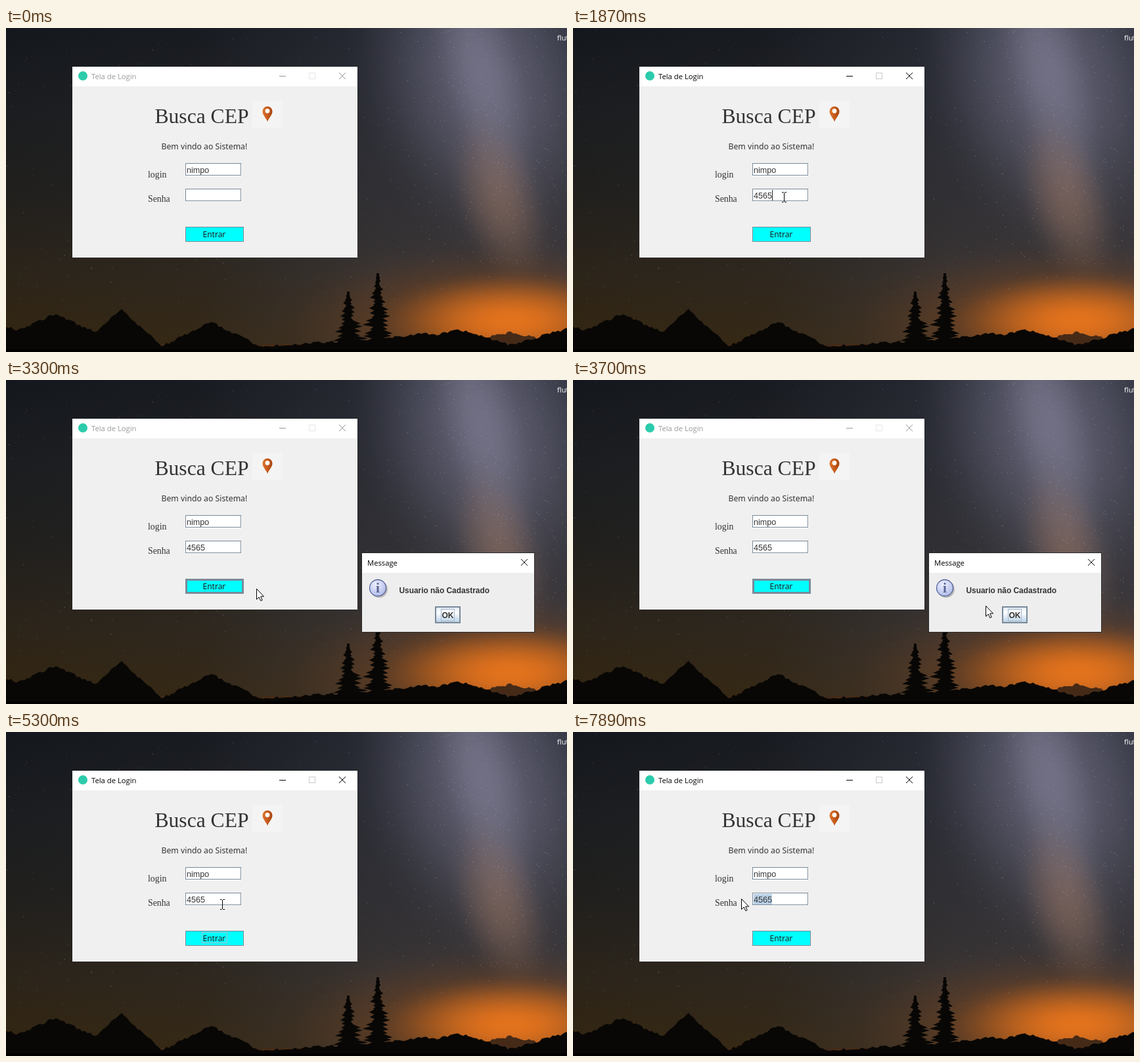
Animation of 854x494 px, one loop 8 s. Source, as an HTML page with a canvas:

```html
<!DOCTYPE html>
<html lang="pt">
<head>
<meta charset="utf-8">
<title>Tela de Login</title>
<style>
  html, body { margin: 0; width: 100%; height: 100%; overflow: hidden; background: #000; }
  canvas, svg { position: absolute; left: 0; top: 0; width: 854px; height: 494px; display: block; }
  text { white-space: pre; fill: #333; }
  .ui { font: 11.25px "Open Sans", sans-serif; }
  .label { font: 12.25px "Noto Sans", sans-serif; }
  .serif { font: 13.8px "Liberation Serif", serif; }
  .field { font: 12.6px "Liberation Sans", sans-serif; }
  .bold { font: bold 11.9px "Liberation Sans", sans-serif; }
  .box { fill: #fff; stroke: #7a8a99; }
  .line { fill: none; stroke: currentColor; }
  .sel { fill: #b8cfe5; }
</style>
</head>
<body>
<canvas id="sky" width="854" height="494"></canvas>
<svg viewBox="0 0 854 494">
  <defs>
    <linearGradient id="metal" x2="0" y2="1">
      <stop stop-color="#dde8f3"/><stop offset=".35" stop-color="#fff"/><stop offset="1" stop-color="#b8cfe5"/>
    </linearGradient>
    <radialGradient id="info" cx=".4" cy=".3" r=".8">
      <stop stop-color="#eef0ff"/><stop offset="1" stop-color="#aab5e6"/>
    </radialGradient>
    <linearGradient id="pin">
      <stop stop-color="#e0752c"/><stop offset="1" stop-color="#a9440d"/>
    </linearGradient>
  </defs>
  <text class="ui" x="839" y="19" style="fill:#fff">flut</text>

  <rect x="100" y="58" width="436" height="293" fill="#222" opacity=".5"/>
  <rect x="101" y="59" width="434" height="291" fill="#f0f0f0"/>
  <rect x="101" y="59" width="434" height="30" fill="#fff"/>
  <circle cx="117" cy="73" r="7" fill="#2bcbab"/>
  <g id="title">
    <text class="ui" x="130" y="78" style="fill:currentColor">Tela de Login</text>
    <path class="line" d="M416 73.5H426M507 68L517 78M517 68L507 78"/>
  </g>
  <rect id="max" x="461.5" y="68.5" width="9" height="9" fill="none"/>

  <text class="serif" x="226.5" y="145" style="font-size:31.6px">Busca CEP</text>
  <rect x="375" y="111" width="46" height="41" fill="#f4f4f4"/>
  <path d="M398 143C396 137 390.5 133 390.5 127A7.5 7.5 0 0 1 405.5 127C405.5 133 400 137 398 143Z" fill="url(#pin)"/>
  <circle cx="398" cy="126.5" r="3.4" fill="#fff"/>
  <text class="label" x="236.5" y="185">Bem vindo ao Sistema!</text>
  <text class="serif" x="216" y="228">login</text>
  <text class="serif" x="216" y="265">Senha</text>

  <rect x="274" y="207" width="85" height="19" fill="#fff"/>
  <rect class="box" x="273.5" y="206.5" width="84" height="18"/>
  <rect id="loginSel" class="sel" y="208" height="16"/>
  <text class="field" x="275" y="221">nimpo</text>
  <rect x="274" y="246" width="85" height="19" fill="#fff"/>
  <rect class="box" x="273.5" y="245.5" width="84" height="18"/>
  <rect id="passSel" class="sel" y="247" height="16"/>
  <text id="pass" class="field" x="275" y="260"></text>
  <rect id="caret" width="1" height="16" fill="#222"/>

  <rect id="enter" x="273.5" y="303.5" width="88" height="22" stroke="#7a8a99"/>
  <rect id="ring" x="275" y="305" width="85" height="19" fill="none" stroke="#7a8a99" stroke-width="2"/>
  <rect id="enterFocus" x="298.5" y="305.5" width="38" height="16" fill="none" stroke="#a3b8cc"/>
  <text class="label" x="299.5" y="319" style="font-size:12px;font-weight:500;fill:#222">Entrar</text>

  <g id="dialog">
    <rect x="541.5" y="263.5" width="263" height="121" fill="#eee" stroke="#2b2b2b"/>
    <rect x="542" y="264" width="262" height="30" fill="#fff"/>
    <text class="ui" x="550" y="283" style="fill:#000">Message</text>
    <path class="line" color="#111" d="M784 273L794 283M794 273L784 283"/>
    <circle cx="568" cy="319" r="13" fill="#000" opacity=".22"/>
    <circle cx="566" cy="317" r="12.5" fill="url(#info)" stroke="#56659a" stroke-width="1.3"/>
    <text x="566" y="324" text-anchor="middle" style="font:bold 21px 'Liberation Serif',serif;fill:#5a6494">i</text>
    <text class="bold" x="598.5" y="325">Usuario não Cadastrado</text>
    <rect id="ok" x="654" y="346" width="37" height="24" stroke="#7a8a99" stroke-width="2"/>
    <rect id="okFocus" x="662.5" y="349.5" width="20" height="18" fill="none" stroke="#a3b8cc"/>
    <text class="bold" x="663.5" y="363" style="font-size:12px">OK</text>
  </g>

  <circle id="press" r="12" fill="#e6e61e"/>
  <g id="cursor">
    <path id="arrow" d="M.5.5V16.5L4.2 13L6.8 18.7L9.2 17.6L6.7 12H11.6Z" fill="#fff" stroke="#000"/>
    <path id="beam" class="line" color="#000" d="M-3 -7.5H-.5M1.5 -7.5H4M.5 -7V7M-3 7.5H-.5M1.5 7.5H4"/>
  </g>
</svg>
<script>
const $ = id => document.getElementById(id);

function drawSky() {
  const c = $('sky').getContext('2d');
  let seed = 7;
  const rnd = () => (seed = seed * 16807 % 2147483647) / 2147483647;

  function wash(x1, y1, ...colors) {
    const g = c.createLinearGradient(0, 0, x1, y1);
    colors.forEach((col, i) => g.addColorStop(i / (colors.length - 1), col));
    c.fillStyle = g;
    c.fillRect(0, 0, 854, 494);
  }
  function glow(x, y, rx, ry, turn, rgb, alpha) {
    const g = c.createRadialGradient(0, 0, 0, 0, 0, 1);
    for (let r = 0; r <= 1; r += .125)
      g.addColorStop(r, `rgba(${rgb},${alpha * (1 - r * r) ** 2})`);
    c.save();
    c.translate(x, y);
    c.rotate(turn);
    c.scale(rx, ry);
    c.fillStyle = g;
    c.fillRect(-1, -1, 2, 2);
    c.restore();
  }
  // each peak is x, y and slope; the highest one shows
  function ridge(color, floor, peaks) {
    c.fillStyle = color;
    c.beginPath();
    c.moveTo(0, 494);
    for (let x = 0; x <= 856; x += 4)
      c.lineTo(x, Math.min(floor, ...peaks.map(([px, py, k]) => py + Math.abs(x - px) * k)) + rnd() * 4);
    c.lineTo(856, 494);
    c.fill();
  }
  function tree(x, top, width) {
    const reach = y => 2 + width * Math.min(1, (y - top) / 80) * (.35 + rnd() * .65);
    c.fillRect(x - 2, top, 4, 494 - top);
    for (let y = top + 5; y < 492; y += 6) {
      c.beginPath();
      c.moveTo(x, y - 6);
      c.lineTo(x - reach(y), y + rnd() * 4);
      c.lineTo(x, y + 6);
      c.lineTo(x + reach(y), y + rnd() * 4);
      c.fill();
    }
  }

  wash(0, 494, '#14171c', '#1b1d20', '#201f1d', '#2b241a', '#35260f');
  wash(854, 0, 'rgba(85,85,105,0)', 'rgba(85,85,105,.06)', 'rgba(85,85,105,.3)', 'rgba(85,85,105,.4)');
  glow(725, 70, 200, 300, -.25, '140,138,165', .5);
  glow(725, 70, 70, 230, -.25, '165,160,185', .28);
  glow(752, 262, 75, 150, -.3, '175,130,105', .42);
  glow(750, 450, 360, 130, 0, '150,75,20', .55);
  glow(768, 446, 210, 78, 0, '240,120,28', .9);

  for (let i = 0; i < 1800; i++) {
    const band = i > 600, y = rnd() * (band ? 360 : 430);
    const x = band ? 705 + y * .2 + (rnd() + rnd() - 1) * 170 : rnd() * 854;
    c.fillStyle = `rgba(205,195,200,${.08 + .4 * rnd() ** 3})`;
    c.fillRect(x | 0, y | 0, 1, 1);
  }

  ridge('#452a17', 480, [[768, 462, .2]]);
  ridge('#080705', 485, [[0, 453, .3], [74, 434, .45], [175, 427, .9], [312, 446, .5],
    [540, 474, .06], [636, 463, .15], [687, 457, .3], [854, 456, .3]]);
  tree(566, 374, 24);
  tree(521, 402, 32);
  c.fillStyle = '#000';
  c.fillRect(0, 490, 854, 4);
}

// pointer moves: start, end, x, y
const moves = [[70, 650, 321, 258], [2400, 2900, 328, 312], [3230, 3690, 633, 345], [4050, 4300, 726, 322],
  [4300, 4600, 670, 354], [4820, 5100, 329, 304], [5300, 5300, 329, 263], [5380, 5750, 303, 218],
  [5750, 6060, 330, 216], [6140, 6480, 246, 216], [6740, 7110, 308, 254], [7190, 7410, 256, 254]];
const STEP = 70;

function pointer(t) {
  let x = 676, y = 470;
  for (const [start, end, toX, toY] of moves) {
    if (t < start) break;
    const done = (Math.floor((t - start) / STEP) + 1) * STEP;
    const k = Math.min(1, done / (end - start + STEP));
    const ease = k * k * (3 - 2 * k);
    x += (toX - x) * ease;
    y += (toY - y) * ease;
  }
  return [Math.round(x), Math.round(y)];
}

const set = (id, attrs) => { for (const k in attrs) $(id).setAttribute(k, attrs[k]); };
const show = (id, on) => { $(id).style.display = on ? '' : 'none'; };

// text from the pointer to the end of the field's text, by whole letters
function select(id, on, x, end) {
  const from = Math.max(275, Math.min(end, 275 + Math.round((x - 275) / 7) * 7));
  show(id, on && from < end);
  set(id, { x: from, width: end - from });
  return from;
}

function render(t) {
  const within = (a, b = 8000) => t >= a && t < b;
  const [x, y] = pointer(t);

  const active = within(800, 3160) || within(4820);
  $('title').style.color = active ? '#000' : '#999';
  set('max', { stroke: active ? '#ccc' : '#e6e6e6' });

  const count = Math.max(0, Math.min(4, Math.floor((t - 1600) / 90) + 1));
  $('pass').textContent = '4565'.slice(0, count);

  const inLogin = within(6140, 7110), inPass = within(7110);
  const loginFrom = select('loginSel', inLogin, t < 6740 ? x : 275, 310);
  const passFrom = select('passSel', inPass, x, 303);
  show('caret', within(800, 1270) || within(1600, 2400) || within(6140, 6740) || within(7110, 7890));
  set('caret', {
    x: inLogin ? loginFrom : inPass ? passFrom : 275 + 7 * count,
    y: inLogin ? 208 : 247
  });

  const enterDown = within(2900, 3160), okDown = within(4610, 4820);
  set('enter', { fill: enterDown ? '#b8cfe5' : '#0ff' });
  show('ring', within(2900, 4820));
  show('enterFocus', within(4820, 6140));
  show('dialog', within(3230, 4820));
  set('ok', { fill: okDown ? '#b8cfe5' : 'url(#metal)' });
  show('okFocus', !okDown);

  show('press', within(800, 870) || enterDown || okDown || within(6140, 6480) || within(7110, 7640));
  set('press', { cx: x, cy: y, opacity: within(7560, 7640) ? .35 : .72 });

  const overField = x > 273 && x < 358 && (y > 206 && y < 225 || y > 245 && y < 264);
  show('cursor', within(70));
  show('arrow', !overField);
  show('beam', overField);
  set('cursor', { transform: `translate(${x} ${y})` });
}

drawSky();
const begin = performance.now();
function tick() {
  render((performance.now() - begin + .5) % 8000);
  requestAnimationFrame(tick);
}
tick();
</script>
</body>
</html>
```
